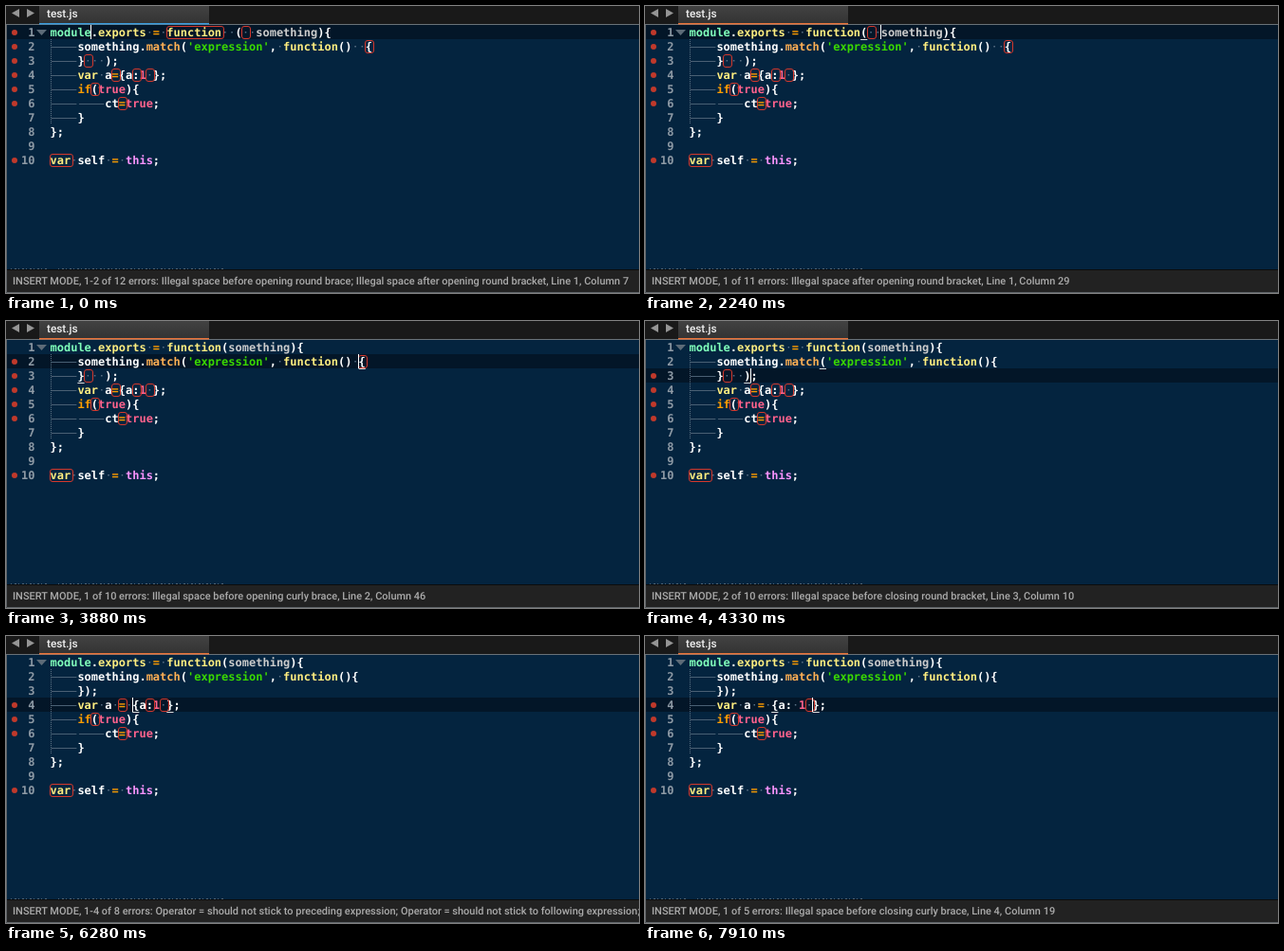
Write an HTML page that moves like this. It is 667 px wide and 303 px high and loops after 8000 ms.

```html
<!DOCTYPE html>
<html lang="en">
<head>
<meta charset="utf-8">
<title>Editor linting</title>
<style>
  html, body { margin: 0; width: 100%; height: 100%; overflow: hidden; background: #04243f; }
  svg { display: block; width: 667px; height: 303px; }
  text { white-space: pre; text-rendering: geometricPrecision; }
  .code { font: bold 12px "DejaVu Sans Mono", monospace; fill: #fff; }
  .num { fill: #8e9aa5; text-anchor: end; }
  .ui { font: 500 10.98px Roboto, sans-serif; fill: #ababab; }
  .tab { font-size: 11.8px; fill: #f2f2f2; }
  .mark { fill: none; stroke: #d5382c; }
  .dot { fill: #c0392b; }
  .ws { stroke: #4a6074; fill: none; }
  .space { fill: #5b7186; }
  .guide { stroke: #5d7183; stroke-dasharray: 1 1; }
</style>
</head>
<body>
<svg viewBox="0 0 667 303">
  <defs>
    <linearGradient id="tabFill" x2="0" y2="1">
      <stop stop-color="#424242"/><stop offset="1" stop-color="#333"/>
    </linearGradient>
  </defs>
  <rect width="667" height="303" fill="#04243f"/>
  <g id="editor"></g>
  <rect width="667" height="19" fill="#191919"/>
  <rect y="19" width="667" height="1" fill="#6a7278"/>
  <rect x="35" width="179" height="19" fill="url(#tabFill)"/>
  <rect id="tabLine" x="35" y="18" width="179" height="1.5"/>
  <path d="M14 3V12L6 7.5ZM22 3V12L30 7.5Z" fill="#959595"/>
  <text class="ui tab" x="43" y="12">test.js</text>
  <path d="M5 277.5H45M55 277.5H230" stroke="#9aa5ad" stroke-dasharray="1 3 2 2" opacity=".5"/>
  <rect y="278" width="667" height="25" fill="#222"/>
  <rect y="278" width="667" height="1" fill="#0c0c0c"/>
  <path d="M.5 20V302.5H667" fill="none" stroke="#5f6468"/>
  <text class="ui" id="status" x="7" y="294"></text>
</svg>
<script>
const LOOP = 8000, X0 = 46.5, CW = 7.224, TOP = 20, ROW = 15;
const $ = id => document.getElementById(id);
const colX = i => X0 + i * CW;
const rowY = l => TOP + (l - 1) * ROW;

const LINES = [
  'module.exports = function  (  something){',
  "    something.match('expression', function()  {",
  '    }   );',
  '    var a={a:1 };',
  '    if(true){',
  '        ct=true;',
  '    }',
  '};',
  '',
  'var self = this;'
];

// lint messages
const space = (where, what) => `Illegal space ${where} ${what}`;
const stick = (op, side) => `Operator ${op} should not stick to ${side} expression`;
const roundBrace = space('before opening', 'round brace');
const afterRound = space('after opening', 'round bracket');
const openCurly = space('before opening', 'curly brace');
const closeRound = space('before closing', 'round bracket');
const closeCurly = space('before closing', 'curly brace');
const colon = stick(':', 'following');
const report = (range, total, ...list) => `${range} of ${total} errors: ${list.join('; ')}`;
const line4 = [stick('=', 'preceding'), stick('=', 'following'), colon, closeCurly];

// editing actions
const at = (line, col) => s => { s.line = line; s.col = col; };
const to = col => s => { s.col = col; };
const msg = (...args) => s => { s.msg = report(...args); };
const undot = line => s => { s.dots = s.dots.filter(l => l !== line); };
const clear = (line, ch) => s => {
  s.marks = s.marks.filter(m => m.line !== line || s.lines[line - 1][m.i] !== ch);
};
const edit = (s, cut, text) => {
  const i = s.col - 1, row = s.lines[s.line - 1], d = text.length - cut;
  s.lines[s.line - 1] = row.slice(0, i - cut) + text + row.slice(i);
  s.marks = s.marks
    .filter(m => m.line !== s.line || m.i < i - cut || m.i >= i)
    .map(m => m.line === s.line && m.i >= i ? { ...m, i: m.i + d } : m);
  s.col += d;
  s.dirty = true;
};
const back = s => edit(s, 1, '');
const type = s => edit(s, 0, ' ');

const STEPS = [
  [150, to(8)], [300, to(15)], [450, to(17)], [750, to(26)], [1050, to(27)], [1200, to(28)],
  [1650, back], [1800, back], [1950, to(27)],
  [2090, to(28), clear(1, 'f')],
  [2240, to(29), msg('1', 11, afterRound)],
  [2540, back], [2690, back],
  [2990, at(2, 27), msg('2', 11, openCurly)],
  [3140, to(32), undot(1)],
  [3290, to(43), msg('1', 10, openCurly)],
  [3440, to(45)], [3730, to(47)], [3880, back], [4030, back],
  [4180, at(3, 11), msg('2', 10, closeRound)],
  [4330, to(10), clear(2, '{'), undot(2)],
  [4480, to(9), msg('1', 9, closeRound)],
  [4780, back], [4930, back], [5080, back],
  [5380, at(4, 6), msg('2-5', 9, ...line4)],
  [5530, to(8), undot(3)],
  [5680, to(10), msg('1-4', 8, ...line4)],
  [5830, type], [6130, to(12)], [6280, type], [6430, to(14)], [6580, to(15)],
  [6710, clear(4, '=')],
  [6860, msg('1-2', 6, colon, closeCurly)],
  [7160, to(16)], [7310, type],
  [7610, to(18), clear(4, ':')],
  [7760, msg('1', 5, closeCurly)],
  [7910, to(19)]
];

const mark = (line, i, len = 1) => ({ line, i, len });
const states = [{
  time: 0, line: 1, col: 7, dirty: false, lines: LINES,
  dots: [1, 2, 3, 4, 5, 6, 10],
  marks: [mark(1, 17, 8), mark(1, 28), mark(2, 46), mark(3, 5), mark(4, 9), mark(4, 12),
    mark(4, 14), mark(5, 6), mark(6, 10), mark(10, 0, 3)],
  msg: report('1-2', 12, roundBrace, afterRound)
}];
for (const [time, ...acts] of STEPS) {
  const last = states[states.length - 1];
  const s = { ...last, time, lines: [...last.lines] };
  acts.forEach(act => act(s));
  states.push(s);
}

// syntax colours, first match wins
const RULES = [
  [/'[^']*'/, '#3ad900'],
  [/\b(?:var|function|exports)\b/, '#ffee80'],
  [/\bmodule\b/, '#80ffbb'],
  [/\bmatch\b/, '#ffb054'],
  [/\bthis\b/, '#fb94ff'],
  [/\btrue\b|\d+/, '#ff628c'],
  [/\bif\b|=/, '#ff9d00'],
  [/(?<=\( *)something/, '#ccc'],
  [/ +/, ''],
  [/\w+|[^\w\s]/, '#fff']
];
const TOKEN = new RegExp(RULES.map(([re]) => `(${re.source})`).join('|'), 'g');

function drawLine(row, n) {
  const y = rowY(n), indent = row.search(/\S|$/);
  let out = `<text class="code num" x="30.5" y="${y + 12}">${n}</text>`;
  for (let i = 0; i < indent; i += 4)
    out += `<path class="ws" d="M${colX(i) + 1.5} ${y + 8.5}H${colX(i + 4) - 1}"/>`;
  for (const m of row.matchAll(TOKEN)) {
    if (m.index < indent) continue;
    const color = RULES[m.slice(1).findIndex(g => g !== undefined)][1];
    if (color) {
      out += `<text class="code" x="${colX(m.index)}" y="${y + 12}" style="fill:${color}">${m[0]}</text>`;
    } else {
      for (let k = 0; k < m[0].length; k++)
        out += `<rect class="space" x="${colX(m.index + k) + 3}" y="${y + 7}" width="1.5" height="1.5"/>`;
    }
  }
  return out;
}

// bracket pair touching the caret, or else the innermost one around it
function brackets(s) {
  const open = [], pairs = [];
  s.lines.forEach((row, r) => [...row].forEach((ch, i) => {
    const p = r * 100 + i;
    if ('({'.includes(ch)) open.push(p);
    else if (')}'.includes(ch)) pairs.push([open.pop(), p]);
  }));
  const p = (s.line - 1) * 100 + s.col - 1;
  return pairs.find(q => q.includes(p - 1)) || pairs.find(q => q.includes(p)) ||
    pairs.find(([a, b]) => a < p && p < b) || [];
}

function draw(s) {
  let out = `<rect x="1" y="${rowY(s.line)}" width="666" height="${ROW}" fill="#031628"/>`;
  out += `<path class="guide" d="M47.5 ${rowY(2)}V${rowY(8)}"/>`;
  out += '<path d="M32 25H43L37.5 31Z" fill="#5d6b78"/>';
  s.lines.forEach((row, r) => { out += drawLine(row, r + 1); });
  for (const l of s.dots) out += `<circle class="dot" cx="9" cy="${rowY(l) + 8}" r="3"/>`;
  for (const m of s.marks)
    out += `<rect class="mark" x="${Math.floor(colX(m.i)) + .5}" y="${rowY(m.line) + 1.5}"
      width="${Math.round(m.len * CW) + 2}" height="13" rx="2.5"/>`;
  for (const p of brackets(s))
    out += `<rect x="${colX(p % 100)}" y="${rowY(Math.floor(p / 100) + 2)}" width="${CW}" height="1" fill="#ddd"/>`;
  out += `<rect x="${Math.floor(colX(s.col - 1))}" y="${rowY(s.line)}" width="1" height="${ROW}" fill="#fff"/>`;
  $('editor').innerHTML = out;
  $('tabLine').setAttribute('fill', s.dirty ? '#e8733a' : '#3a9bdc');
  $('status').textContent = `INSERT MODE, ${s.msg}, Line ${s.line}, Column ${s.col}`;
}

const start = performance.now();
let shown;
function tick() {
  const t = (performance.now() - start) % LOOP;
  const s = states.findLast(v => v.time <= t);
  if (s !== shown) draw(shown = s);
  requestAnimationFrame(tick);
}
tick();
</script>
</body>
</html>
```
